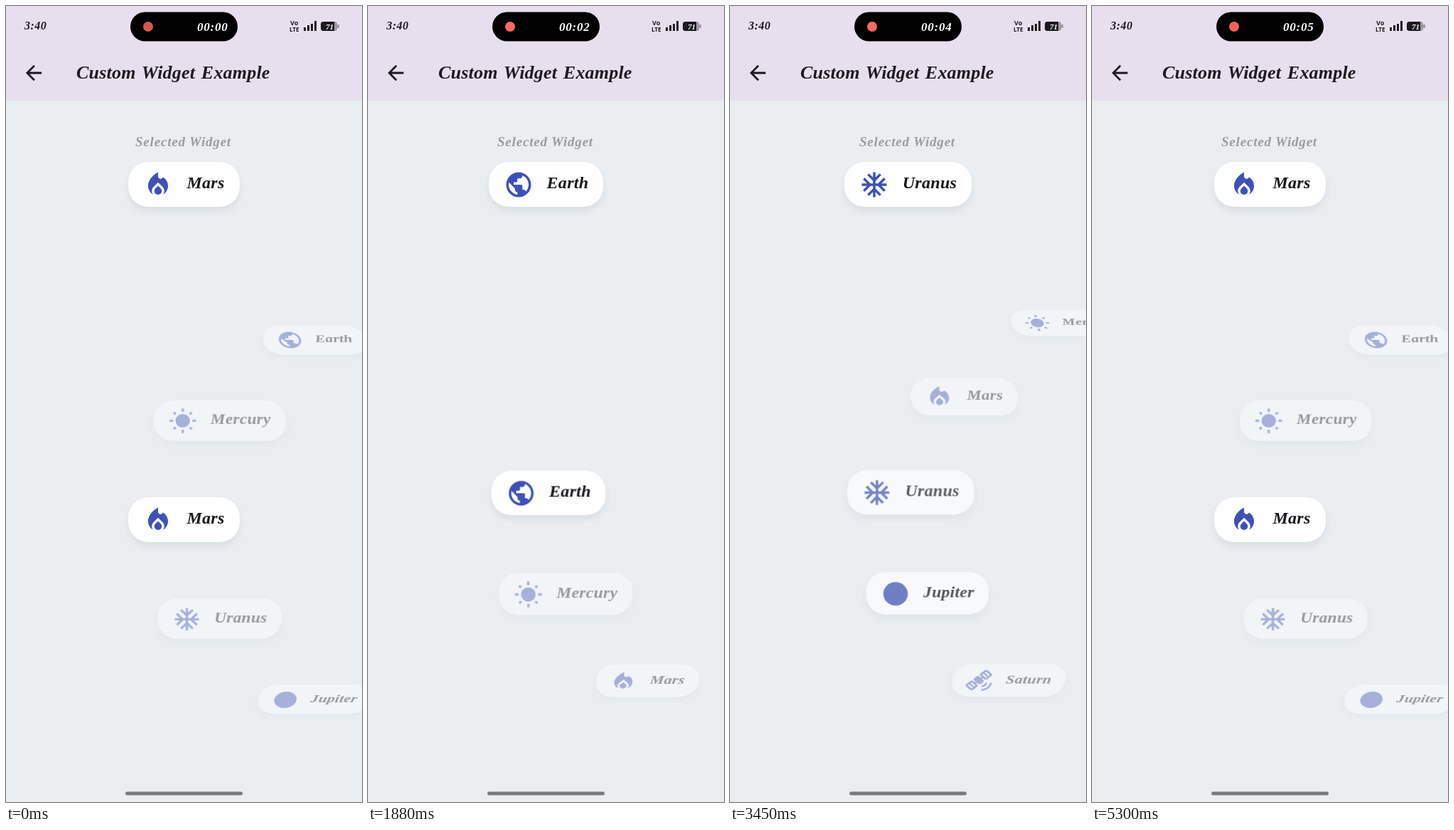
An HTML page that plays this animation: 501x1118 px, repeating every 5330 ms.

```html
<!DOCTYPE html>
<html lang="en">
<head>
<meta charset="utf-8">
<title>Custom Widget Example</title>
<style>
html, body { margin: 0; width: 100%; height: 100%; overflow: hidden; background: #eaeef1; }
#stage { position: relative; width: 501px; height: 1118px; overflow: hidden; }
#stage, svg text { font: italic bold 24px "Liberation Serif", serif; }
#stage > svg, #wheel { position: absolute; inset: 0; }
#wheel { perspective: 444.5px; perspective-origin: 250.5px 721.5px; }
.row { position: absolute; left: 0; top: 690px; width: 501px; height: 63px; display: flex; justify-content: center; }
#picked { top: 219px; }
.chip { display: flex; align-items: center; gap: 19px; box-sizing: border-box; height: 63px; padding: 0 21px;
  border-radius: 28px; background: #fefefe; color: #17171c; letter-spacing: .3px;
  box-shadow: 0 6px 10px rgba(40, 50, 60, .08); }
.chip svg { width: 42px; height: 42px; fill: #3f51b5; fill-rule: evenodd; }
.chip span { position: relative; top: -2px; }
</style>
</head>
<body>
<div id="stage">
  <svg width="501" height="1118" fill="#1b1a20">
    <path fill="#e8dfee" d="M0 0H501V133H0z"/>
    <text x="26" y="33" style="font-size:16px;letter-spacing:.5px">3:40</text>
    <rect x="175" y="8.5" width="151" height="41" rx="20.5" fill="#000"/>
    <circle id="dot" cx="200" cy="29" r="7"/>
    <text id="clock" x="269" y="35" fill="#fff" style="font-size:17px;letter-spacing:.8px"></text>
    <text x="400" y="27" style="font:bold 9px 'Open Sans',sans-serif">Vo</text>
    <text x="399" y="36" style="font:bold 8px 'Open Sans',sans-serif">LTE</text>
    <path d="M419 35v-5h3v5zM424 35v-8h3v8zM429 35v-10h3v10zM434 35v-14h3v14z"/>
    <rect x="445" y="22" width="21" height="13" rx="3.5" fill="#9d99a2"/>
    <path d="M446.500 22H462V35H446.500a3.500 3.500 0 0 1-3.500-3.500V25.500a3.500 3.500 0 0 1 3.500-3.500z"/>
    <rect x="466" y="26" width="3" height="5" rx="1" fill="#9d99a2"/>
    <text x="450" y="32.500" fill="#fff" style="font-size:11px">71</text>
    <path transform="translate(22.300 77.300) scale(1.392)"
      d="M20 11H7.830l5.590-5.590L12 4l-8 8 8 8 1.410-1.410L7.830 13H20z"/>
    <text x="99" y="102" style="font-size:26px;letter-spacing:.2px;word-spacing:2px">Custom Widget Example</text>
    <text x="182" y="197" fill="#9a9da0" style="font-size:19px;letter-spacing:.8px">Selected Widget</text>
  </svg>
  <div id="picked" class="row"></div>
  <div id="wheel"></div>
  <svg width="501" height="1118"><rect x="168" y="1103.500" width="165" height="5" rx="2.500" fill="#77797b"/></svg>
</div>
<script>
const path = d => `<path d="${d}"/>`;
const ray = (_, i) => `<path transform="rotate(${i * 45} 12 12)" d="M11 ${i % 2 ? 1.4 : 1}h2v${i % 2 ? 2.4 : 3}h-2z"/>`;
const items = [
  ['Earth', path('M12 2C6.48 2 2 6.48 2 12s4.48 10 10 10 10-4.48 10-10S17.52 2 12 2zm-1 17.93c-3.95-.49-7-3.85-7-7.93 0-.62.08-1.21.21-1.79L9 15v1c0 1.1.9 2 2 2v1.93zm6.9-2.54c-.26-.81-1-1.39-1.9-1.39h-1v-3c0-.55-.45-1-1-1H8v-2h2c.55 0 1-.45 1-1V7h2c1.1 0 2-.9 2-2v-.41c2.93 1.19 5 4.06 5 7.41 0 2.08-.8 3.97-2.1 5.39z')],
  ['Mercury', '<circle cx="12" cy="12" r="6"/>' + Array.from({ length: 8 }, ray).join('')],
  ['Mars', path('M12 12.9l-2.13 2.09C9.31 15.55 9 16.28 9 17.06 9 18.68 10.35 20 12 20s3-1.32 3-2.94c0-.78-.31-1.52-.87-2.07zM16 6l-.44.55C14.38 8.02 12 7.19 12 5.3V2S4 6 4 13c0 2.92 1.56 5.47 3.89 6.86C7.33 19.07 7 18.1 7 17.06c0-1.32.52-2.56 1.47-3.5L12 10.1l3.53 3.47c.95.93 1.47 2.17 1.47 3.5 0 1.02-.31 1.96-.85 2.75 1.89-1.15 3.29-3.06 3.71-5.3C20.52 10.97 18.79 7.62 16 6z')],
  ['Uranus', path('M22 11h-4.17l3.24-3.24-1.41-1.42L15 11h-2V9l4.66-4.66-1.42-1.41L13 6.17V2h-2v4.17L7.76 2.93 6.34 4.34 11 9v2H9L4.34 6.34 2.93 7.76 6.17 11H2v2h4.17l-3.24 3.24 1.41 1.42L9 13h2v2l-4.66 4.66 1.42 1.41L11 17.83V22h2v-4.17l3.24 3.24 1.42-1.41L13 15v-2h2l4.66 4.66 1.41-1.42L17.83 13H22z')],
  ['Jupiter', '<circle cx="12" cy="12" r="10"/>'],
  ['Saturn', path('M15.44.59l-3.18 3.18c-.78.78-.78 2.05 0 2.83l1.24 1.24-.71.71-1.24-1.25c-.78-.78-2.05-.78-2.83 0L7.3 8.72c-.78.78-.78 2.05 0 2.83l1.24 1.24-.71.71-1.23-1.25c-.78-.78-2.05-.78-2.83 0L.59 15.43c-.78.78-.78 2.05 0 2.83l3.54 3.54c.78.78 2.05.78 2.83 0l3.18-3.18c.78-.78.78-2.05 0-2.83L8.9 14.55l.71-.71 1.24 1.24c.78.78 2.05.78 2.83 0l1.41-1.41c.78-.78.78-2.05 0-2.83l-1.25-1.29.71-.71 1.24 1.24c.78.78 2.05.78 2.83 0l3.18-3.18c.78-.78.78-2.05 0-2.83L18.26.53c-.77-.73-2.04-.73-2.82.06zM6.6 19.32l-1.06 1.06L2 16.85l1.06-1.06zM8.72 17.2l-1.06 1.06-3.54-3.54 1.06-1.06zM19.32 6.6l1.06-1.06L16.85 2l-1.06 1.06zM17.2 8.72l1.06-1.06-3.54-3.54-1.06 1.06zM21 14h2c0 4.97-4.03 9-9 9v-2c3.87 0 7-3.13 7-7zM14 17v2c2.76 0 5-2.24 5-5h-2c0 1.66-1.34 3-3 3z')],
];
const chip = ([name, icon]) => `<div class="chip"><svg viewBox="0 0 24 24">${icon}</svg><span>${name}</span></div>`;

const LOOP = 5330, RADIUS = 793, STEP = 10.43, BULGE = 3127, FADE = 200;
// Wheel position in items, by time in ms
const keys = [[0, 2], [700, 2], [1000, 1.64], [1300, .8], [1600, .1], [1720, 0], [1790, 0], [1880, .257],
  [2210, 4], [2450, 4.75], [2760, 4.96], [2900, 5], [3020, 5], [3300, 3.68], [3450, 3.27],
  [3900, 2.38], [4300, 2.077], [4700, 2], [LOOP, 2]];
const secant = i => keys[i + 1] && keys[i] ? (keys[i + 1][1] - keys[i][1]) / (keys[i + 1][0] - keys[i][0]) : 0;
const slopes = keys.map((_, i) => {
  const a = secant(i - 1), b = secant(i);
  return a * b > 0 ? 2 * a * b / (a + b) : 0;
});

function position(t) {
  t = Math.max(0, t);
  const i = keys.findIndex((_, n) => t < keys[n + 1][0]);
  const [t0, p0] = keys[i], [t1, p1] = keys[i + 1], h = t1 - t0, u = (t - t0) / h;
  return p0 + (p1 - p0) * u * u * (3 - 2 * u)
    + h * u * (1 - u) * (slopes[i] * (1 - u) - slopes[i + 1] * u);
}
const selected = t => Math.round(position(t));

// Linear fade: share of the recent past in which the item was selected
function opacity(i, t) {
  let hits = 0;
  for (let n = 0; n < 40; n++) hits += selected(t - n * FADE / 40) === i;
  return .4 + .6 * hits / 40;
}

const $ = id => document.getElementById(id);
const rows = items.map(item => {
  const row = document.createElement('div');
  row.className = 'row';
  row.innerHTML = chip(item);
  return $('wheel').appendChild(row);
});
let shown = -1;

function draw(now) {
  const t = now % LOOP, pos = position(t), pick = selected(t);
  rows.forEach((row, i) => {
    const angle = (pos - i) * STEP;
    const shift = BULGE * (1 - Math.cos(angle * Math.PI / 180));
    row.style.visibility = Math.abs(i - pos) > 2.6 ? 'hidden' : 'visible';
    row.style.opacity = opacity(i, t);
    row.style.transform = `translate3d(${shift}px, 0, ${-RADIUS}px) rotateX(${angle}deg) translateZ(${RADIUS}px)`;
  });
  if (pick !== shown) $('picked').innerHTML = chip(items[shown = pick]);
  const glow = .75 + .25 * Math.cos((t - 1920) / 1600 * 2 * Math.PI);
  $('dot').setAttribute('fill', `rgb(${255 * glow},${106 * glow},${96 * glow})`);
  $('clock').textContent = '00:0' + Math.floor((t + 690) / 1000);
}
const start = performance.now();
function tick() {
  draw(performance.now() - start);
  requestAnimationFrame(tick);
}
tick();
</script>
</body>
</html>
```
